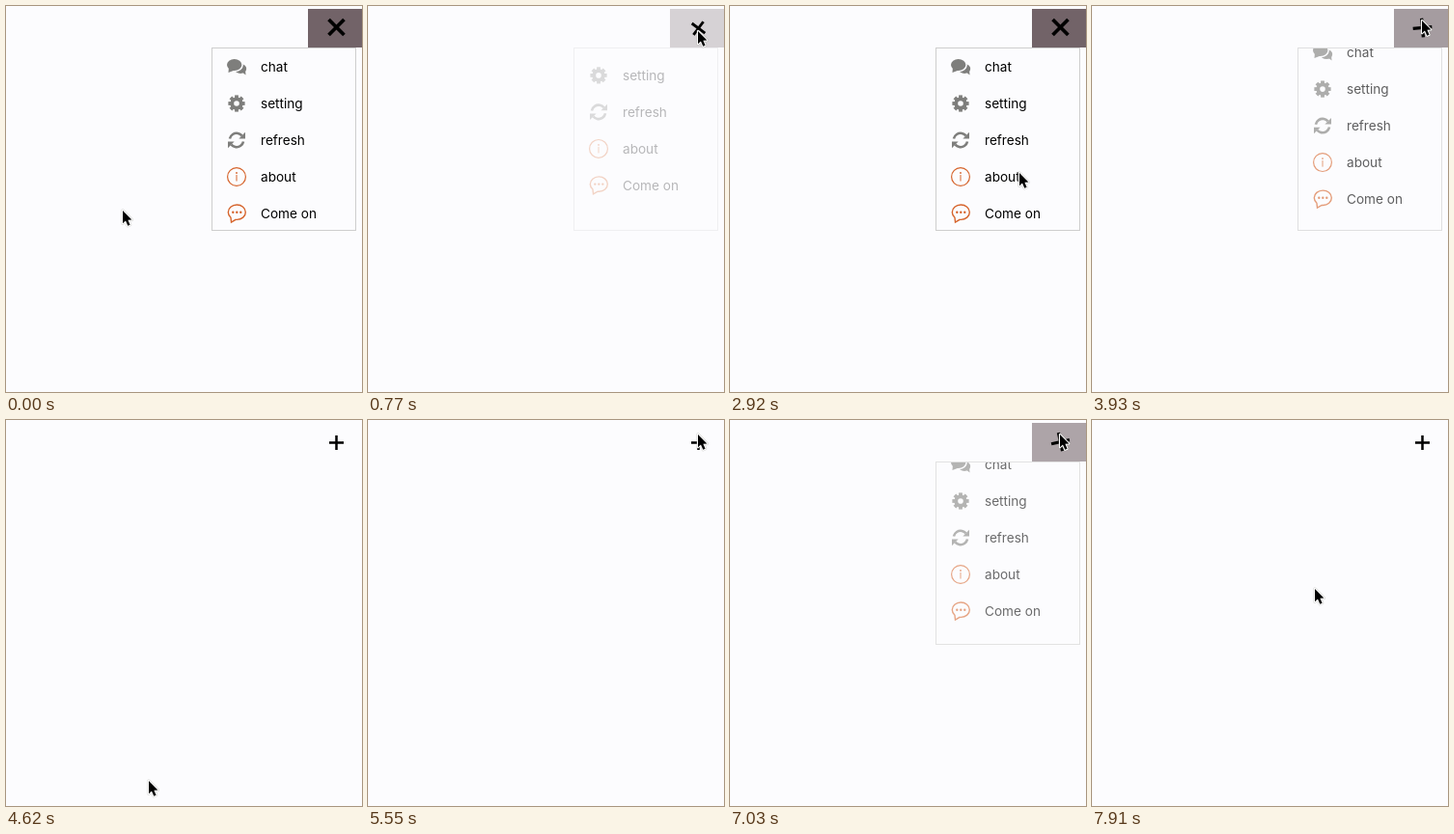
Animation of 369x400 px, one loop 7.99 s. Source, as an HTML page with a canvas:

```html
<!DOCTYPE html>
<html lang="en">
<head>
<meta charset="utf-8">
<title>Menu</title>
<style>
html, body { margin: 0; width: 100%; height: 100%; overflow: hidden; background: #fcfcfe; }
canvas { display: block; }
</style>
</head>
<body>
<canvas id="stage" width="369" height="400"></canvas>
<script>
const ctx = document.getElementById('stage').getContext('2d');
const LOOP = 7990, TURN = 700;
const PAPER = [252, 252, 254];
const BROWN = [114, 99, 104], GREY = [126, 126, 124], ORANGE = [214, 100, 44];
const INK = [0, 0, 0], LINE = [206, 206, 206];

// the menu starts open and each click flips it
const clicks = [310, 2215, 3640, 5765, 6715];

// pointer trips away from the button: peak time, half length, offset
const trips = [
  { at: 0, span: 300, dx: -221, dy: 186 },
  { at: 1450, span: 430, dx: -32, dy: 350 },
  { at: 2920, span: 430, dx: -42, dy: 147 },
  { at: 3110, span: 150, dx: 0, dy: 240 },
  { at: 4620, span: 230, dx: -194, dy: 359 },
  { at: 5100, span: 400, dx: -80, dy: 130 },
  { at: 7910, span: 240, dx: -111, dy: 160 }
];

const clamp = x => Math.max(0, Math.min(1, x));
const smooth = x => x * x * (3 - 2 * x);
const mix = (a, b, k) => a + (b - a) * k;
const fade = (color, p) =>
  `rgb(${color.map((v, i) => Math.round(mix(PAPER[i], v, p))).join(',')})`;

function openness(t) {
  return clicks.reduce((p, start, i) => {
    const k = smooth(clamp((t - start) / TURN));
    return i % 2 ? p + k : p - k;
  }, 1);
}

// each trip lingers around its peak
function pointerAt(t) {
  let x = 342, y = t < 3300 ? 26 : 15;
  for (const { at, span, dx, dy } of trips) {
    const k = smooth(clamp(1.5 * (1 - Math.abs(t - at) / span)));
    x += dx * k;
    y += dy * k;
  }
  return [x, y];
}

function shape(...points) {
  ctx.beginPath();
  points.forEach(([x, y]) => ctx.lineTo(x, y));
  ctx.closePath();
}

function oval(x, y, rx, ry = rx) {
  ctx.beginPath();
  ctx.ellipse(x, y, rx, ry, 0, 0, Math.PI * 2);
}

function disc(x, y, rx, ry) {
  oval(x, y, rx, ry);
  ctx.fill();
}

function chatIcon() {
  const color = ctx.fillStyle;
  disc(4, 2, 6.2, 5);
  shape([5, 5], [9, 3], [9.5, 8.5]);
  ctx.fill();
  ctx.fillStyle = fade(PAPER, 1);
  disc(-2, -1.8, 8.8, 7);
  ctx.fillStyle = color;
  disc(-2.3, -2, 7.7, 6);
  shape([-8, 0], [-8.5, 6], [-2, 3.5]);
  ctx.fill();
}

function gearIcon() {
  for (let i = 0; i < 8; i++) {
    ctx.fillRect(-1.9, -8.6, 3.8, 4);
    ctx.rotate(Math.PI / 4);
  }
  ctx.lineWidth = 3.8;
  oval(0, 0, 4.7);
  ctx.stroke();
}

function refreshIcon() {
  ctx.lineWidth = 2.6;
  for (let i = 0; i < 2; i++) {
    ctx.beginPath();
    ctx.arc(0, 0, 7.2, 0.2 - Math.PI, -0.7);
    ctx.stroke();
    shape([9, -8.2], [9, -1.6], [2.4, -1.6]);
    ctx.fill();
    ctx.rotate(Math.PI);
  }
}

function infoIcon() {
  ctx.lineWidth = 1.2;
  oval(0, 0, 9.4);
  ctx.stroke();
  disc(0, -4, 0.9);
  ctx.fillRect(-0.5, -2, 1, 6.5);
}

function bubbleIcon() {
  ctx.lineWidth = 1.4;
  ctx.beginPath();
  ctx.ellipse(0.3, -1.3, 9, 7.7, 0, 2.35, 1.7 + Math.PI * 2);
  ctx.lineTo(-5.5, 9);
  ctx.closePath();
  ctx.stroke();
  [-4, 0, 4].forEach(x => disc(x + 0.3, -1.3, 1.2));
}

const items = [
  ['chat', chatIcon, GREY], ['setting', gearIcon, GREY], ['refresh', refreshIcon, GREY],
  ['about', infoIcon, ORANGE], ['Come on', bubbleIcon, ORANGE]
];

function drawMenu(p) {
  ctx.save();
  ctx.beginPath();
  ctx.rect(214, 44, 148, 188);
  ctx.clip();
  ctx.font = '13.6px Inter, "Open Sans", sans-serif';
  items.forEach(([label, icon, color], i) => {
    const y = 63 + i * 38 - 40 * (1 - p);
    ctx.save();
    ctx.translate(239, y);
    ctx.fillStyle = ctx.strokeStyle = fade(color, p);
    icon();
    ctx.restore();
    ctx.fillStyle = fade(INK, p);
    ctx.fillText(label, 264, y + 5);
  });
  ctx.restore();

  ctx.lineWidth = 1;
  ctx.strokeStyle = fade(LINE, p);
  ctx.strokeRect(213.5, 43.5, 149, 189);
}

function drawButton(p) {
  ctx.fillStyle = fade(BROWN, p);
  ctx.fillRect(313, 3, 56, 40);
  ctx.save();
  ctx.translate(342.5, mix(23.5, 22, p));
  ctx.rotate(p * Math.PI * 0.75);
  ctx.scale(1 + p / 2, 1 + p / 2);
  ctx.fillStyle = fade(INK, 1);
  ctx.fillRect(-7.5, -1.25, 15, 2.5);
  ctx.fillRect(-1.25, -7.5, 2.5, 15);
  ctx.restore();
}

function outline(color, width) {
  ctx.strokeStyle = color;
  ctx.lineWidth = width;
  ctx.stroke();
}

function drawPointer([x, y]) {
  ctx.save();
  ctx.translate(x, y);
  ctx.lineJoin = 'round';
  shape([0, 0], [0, 13.3], [3, 10.6], [5.3, 15.8], [7.6, 14.8], [5.4, 9.7], [9.4, 9.6]);
  outline('rgba(150,150,140,0.3)', 3.4);
  outline('#fff', 2);
  ctx.fillStyle = fade(INK, 1);
  ctx.fill();
  ctx.restore();
}

function draw(t) {
  const p = openness(t);
  ctx.fillStyle = fade(PAPER, 1);
  ctx.fillRect(0, 0, 369, 400);
  if (p > 0.001) drawMenu(p);
  drawButton(p);
  drawPointer(pointerAt(t));
}

let begin;
function frame(now) {
  begin ??= now;
  draw(Math.max(0, now - begin) % LOOP);
  requestAnimationFrame(frame);
}
draw(0);
requestAnimationFrame(frame);
</script>
</body>
</html>
```
